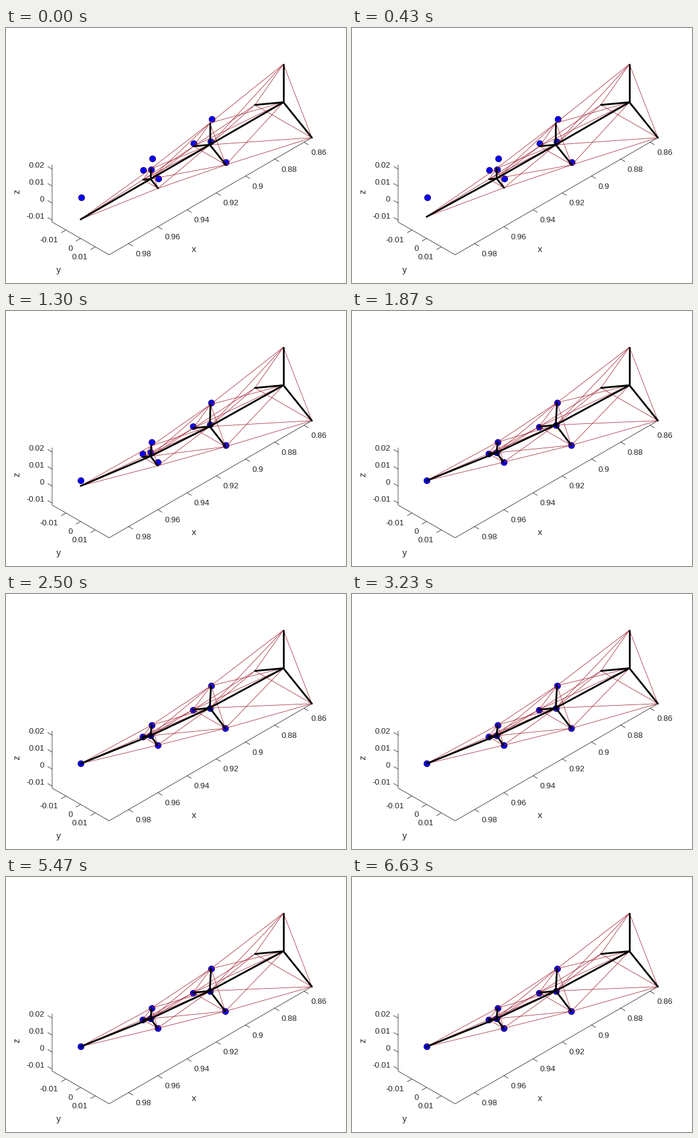
Write a matplotlib script that moves like this. It is 560 px wide and 420 px high and loops after 6670 ms.

```python
import numpy as np
import matplotlib.pyplot as plt
from matplotlib.animation import FuncAnimation
from matplotlib.collections import LineCollection

W, H, DPI = 560, 420, 100
FRAMES, STEP = 230, 29      # 6670 ms loop
SETTLE = 1880               # ms until the structure reaches the markers
PX = 72 / DPI
INK = "#262626"

# Orthographic view: screen pixels per unit along x, y and z
ORIGIN = np.array([456.4, 121.8])
VIEW = np.array([[-2408, 1391], [2420, 1390], [0, -2800]])

X0, SPAN = 0.8546, 0.1387   # root position and length of the spine
LIFT = 0.0128               # final rise of the tip
PLATES = [(0, 0.0224), (0.363, 0.0127), (0.655, 0.0059)]  # place on spine, arm
ANGLES = np.radians([90, 210, 330])
TIP = 4 * len(PLATES)

XMAX = X0 + SPAN
YMAX = PLATES[0][1] * np.cos(np.pi / 6)
ZMAX = PLATES[0][1]
ZMIN = -ZMAX / 2


def project(points):
    return ORIGIN + (np.asarray(points) - (X0, 0, 0)) @ VIEW


def pose(f):
    """Screen nodes at bend f: hub and three arms per plate, then the tip."""
    p = 4 - 2 * f           # the bend starts near the tip and spreads
    nodes = []
    for s, arm in PLATES:
        tilt = np.arctan(f * LIFT / SPAN * p * s ** (p - 1))
        hub = np.array([X0 + SPAN * s, 0, f * LIFT * s ** p])
        nodes.append(hub)
        for a in ANGLES:
            up = arm * np.sin(a)
            nodes.append(hub + (-up * np.sin(tilt), arm * np.cos(a), up * np.cos(tilt)))
    nodes.append((XMAX, 0, f * LIFT))
    return project(nodes)


rods, cables = [], []
for hub in range(0, TIP, 4):
    arms = [hub + 1, hub + 2, hub + 3]
    rods += [(hub, hub + 4)] + [(hub, k) for k in arms]
    cables += zip(arms, arms[1:] + arms[:1])
    for k in arms:
        if hub + 4 < TIP:
            cables += [(k, k + 4), (hub, k + 4), (hub + 4, k)]
        else:
            cables.append((k, TIP))
rods, cables = np.array(rods), np.array(cables)

plt.rcParams["font.family"] = "Liberation Sans"
fig = plt.figure(figsize=(W / DPI, H / DPI), dpi=DPI, facecolor="white")
ax = fig.add_axes([0, 0, 1, 1])
ax.set_xlim(-0.5, W - 0.5)
ax.set_ylim(H - 0.5, -0.5)
ax.axis("off")


def stroke(points):
    ax.plot(*np.transpose(points), color=INK, lw=0.8 * PX, zorder=1)


def label(x, y, text, size=13.3, ha="center", **kw):
    ax.text(x, y, text, fontsize=size * PX, color=INK, ha=ha,
            va="center_baseline", **kw)


def tick(point, value, mark, shift, ha):
    at = project(point)
    stroke([at, at + mark])
    label(*(at + shift), f"{value:.2f}".rstrip("0").rstrip("."), ha=ha)


stroke(project([(XMAX, -YMAX, ZMAX), (XMAX, -YMAX, ZMIN),
                (XMAX, YMAX, ZMIN), (X0, YMAX, ZMIN)]))
for k in range(86, 99, 2):
    tick((k / 100, YMAX, ZMIN), k / 100, (7, 4), (11.3, 16.4), "left")
for k in range(-1, 2):
    tick((XMAX, k / 100, ZMIN), k / 100, (-7.5, 4.3), (-13.1, 16), "right")
for k in range(-1, 3):
    tick((XMAX, -YMAX, k / 100), k / 100, (-7, -4), (-12.7, -6.5), "right")
label(309, 363, "x", 14.6)
label(86, 397, "y", 14.6)
label(18, 271, "z", 14.6, rotation=90)

dots, = ax.plot([], [], "o", ms=10.3 * PX, mfc="#0000ff", mec="#3c0c3c",
                mew=0.8 * PX, ls="none", zorder=2)
red = LineCollection([], colors="#a01c2c", linewidths=0.75 * PX, zorder=3)
black = LineCollection([], colors="black", linewidths=2.9 * PX,
                       capstyle="round", zorder=4)
ax.add_collection(red)
ax.add_collection(black)

goal = pose(1)[4:]
DRIFT = np.array([1.2, -0.7])


def draw(i):
    u = min(i * STEP / SETTLE, 1)
    f = u * u * (3 - 2 * u)
    nodes = pose(f)
    dots.set_data(*(goal + DRIFT * (1 - f)).T)
    red.set_segments(nodes[cables])
    black.set_segments(nodes[rods])
    return dots, red, black


anim = FuncAnimation(fig, draw, frames=FRAMES, interval=STEP,
                     repeat=True, repeat_delay=0, blit=False)
plt.show()
```
